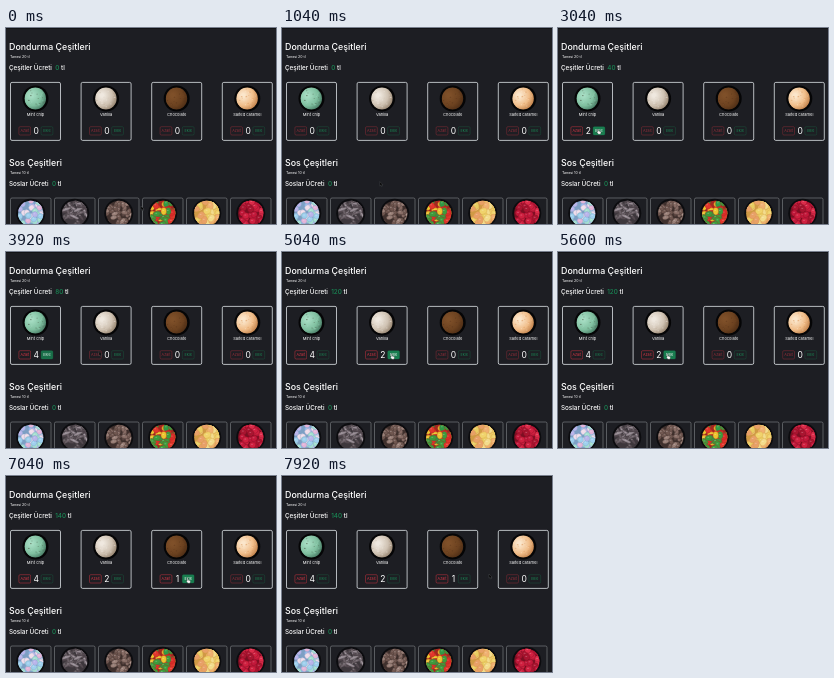
Write an HTML page that moves like this. It is 270x196 px and loops after 8 s.

```html
<!DOCTYPE html>
<html lang="tr">
<head>
<meta charset="utf-8">
<title>Dondurma Çeşitleri</title>
<style>
  html, body { margin: 0; width: 100%; height: 100%; overflow: hidden; background: #1d1e23; }
  svg { display: block; width: 270px; height: 196px; }
  text { font-family: Inter, "Liberation Sans", sans-serif; fill: #fff; white-space: pre; }
  .title { font-size: 8.85px; font-weight: 500; }
  .unit { font-size: 3.6px; }
  .total { font-size: 6.3px; font-weight: 500; }
  .sum { fill: #198754; }
  .mid { text-anchor: middle; }
  .name { font-size: 4px; }
  .count { font-size: 8.5px; }
  .label { font-size: 3.7px; }
  .card { fill: none; stroke: #dee2e6; stroke-width: .8; }
  .sauce { stroke: #85888c; stroke-width: .6; }
</style>
</head>
<body>
<svg id="stage" viewBox="0 0 270 196"></svg>
<script>
const LOOP = 8000, LEFT = 4.5, CARD_STEP = 70.6, SAUCE_STEP = 44;
const stage = document.getElementById('stage');

function add(tag, attrs = {}, parent = stage, content) {
  const el = document.createElementNS('http://www.w3.org/2000/svg', tag);
  for (const key in attrs) el.setAttribute(key, attrs[key]);
  if (content !== undefined) el.textContent = content;
  parent.append(el);
  return el;
}

function randomFrom(seed) {
  return () => (seed = (seed * 16807) % 2147483647) / 2147483647;
}

function heading(y, title, unit, total) {
  add('text', { x: 3, y, class: 'title' }, stage, title);
  add('text', { x: 4, y: y + 8, class: 'unit' }, stage, unit);
  const line = add('text', { x: 3, y: y + 20, class: 'total' });
  add('tspan', {}, line, total + '  ');
  const sum = add('tspan', { class: 'sum' }, line, '0');
  add('tspan', {}, line, ' tl');
  return sum;
}

function clipCircle(id, cx, cy, r) {
  add('circle', { cx, cy, r }, add('clipPath', { id }));
  return add('g', { 'clip-path': `url(#${id})` });
}

function scoop(cx, cy, [light, base, dark, speck], seed) {
  const rnd = randomFrom(seed);
  add('circle', { cx, cy, r: 13, fill: '#050506' });
  const shade = add('radialGradient', { id: 'shade' + seed, cx: .32, cy: .36, r: .78 });
  [light, base, dark].forEach((color, i) =>
    add('stop', { offset: [.1, .6, 1][i], 'stop-color': color }, shade));
  const g = clipCircle('scoop' + seed, cx, cy, 11.4);
  add('ellipse', { cx: cx - .2, cy, rx: 10.7, ry: 11, fill: `url(#shade${seed})` }, g);
  for (let i = 0; i < 24; i++) {
    const a = rnd() * 6.283, d = Math.sqrt(rnd()) * 9.6;
    add('ellipse', {
      cx: cx + d * Math.cos(a), cy: cy + d * Math.sin(a), rx: .4 + rnd() * .7, ry: .3 + rnd() * .4,
      fill: i % 2 ? light : speck, opacity: .5
    }, g);
  }
}

function bowl(cx, [back, ...colors], seed, long, wide) {
  const rnd = randomFrom(seed), cy = 185.3;
  add('circle', { cx, cy, r: 14.5, fill: '#0c0c0f' });
  const g = clipCircle('bowl' + seed, cx, cy, 12.6);
  add('rect', { x: cx - 14, y: cy - 14, width: 28, height: 28, fill: back }, g);
  for (let i = 0; i < 44; i++) {
    const x = cx - 13 + rnd() * 26, y = cy - 13 + rnd() * 24;
    add('ellipse', {
      cx: x, cy: y, rx: long, ry: wide, transform: `rotate(${rnd() * 180} ${x} ${y})`,
      fill: colors[Math.floor(rnd() * colors.length)], stroke: back, 'stroke-width': .3
    }, g);
    add('ellipse', { cx: x - .5, cy: y - .7, rx: 1, ry: .5, fill: '#fff', opacity: .25 }, g);
  }
}

function button(x, color, label, edge) {
  const g = add('g');
  const box = add('rect', {
    x, y: 98.7, width: 11.8, height: 8.3, rx: 1.2, fill: color, 'fill-opacity': 0,
    stroke: color, 'stroke-width': .6, 'stroke-opacity': edge
  }, g);
  const text = add('text', { x: x + 5.9, y: 104.1, class: 'mid label' }, g, label);
  text.style.fill = color;
  return { g, box, text };
}

add('rect', { width: 270, height: 196, fill: '#1d1e23' });
add('rect', { width: 270, height: 1, fill: '#121316' });

const sum = heading(22, 'Dondurma Çeşitleri', 'Tanesi 20 tl', 'Çeşitler Ücreti');
heading(138, 'Sos Çeşitleri', 'Tanesi 10 tl', 'Soslar ÜCreti');

// Each flavour: name, scoop colours, click times, and the span with a filled button
const flavours = [
  ['Mint chip', ['#a5dcc2', '#7fbf9f', '#3f705b', '#46513f'], [2160, 2680, 3300, 3640], [1680, 3900]],
  ['Vanilla', ['#efe8df', '#cfc2b2', '#8c7964', '#b39f89'], [4700, 4960], [4260, 5760]],
  ['Chocolate', ['#7f5029', '#6c4220', '#4a2b14', '#56331a'], [6840], [6520, 7440]],
  ['Salted caramel', ['#fbe6cb', '#f0bd89', '#b8763f', '#d99456'], [], [9000, 9001]]
];

const cards = flavours.map(([name, colors, clicks, hover], i) => {
  const x = LEFT + i * CARD_STEP, cx = x + 25;
  add('rect', { x, y: 54.4, width: 50, height: 58, rx: 1.5, class: 'card' });
  scoop(cx, 70.5, colors, 31 + i * 97);
  add('text', { x: cx, y: 88.2, class: 'mid name' }, stage, name);
  const less = button(cx - 16.6, '#dc3545', 'Azalt', .8);
  const count = add('text', { x: cx + .8, y: 106, class: 'mid count' }, stage, '0');
  const more = button(cx + 5.6, '#198754', 'Ekle', .4);
  return { cx, clicks, hover, less, count, more };
});

// Bowl colours with the half length and half width of one piece
const sauces = [
  [['#7d9fc4', '#9fd0ee', '#e3b4d8', '#b9b4ea', '#a5e0cf', '#8fb8ec', '#f0dcea'], 2.9, 2.7],
  [['#3d373c', '#6c6168', '#857a82', '#544a50', '#978c94'], 5, 1.3],
  [['#3f302d', '#705750', '#886d66', '#594440', '#9a8078'], 3.4, 2],
  [['#a3271f', '#d92c28', '#ecc52f', '#2f9a45', '#e2362c', '#3c9c3c'], 3.8, 2.8],
  [['#d09a45', '#f0d36c', '#efb070', '#f3dc8c', '#e8a067', '#e9cd62'], 4, 3],
  [['#7c0f22', '#c2183a', '#dc2c4a', '#a91530', '#d02040'], 3.2, 3]
];
sauces.forEach(([colors, long, wide], i) => {
  const x = LEFT + i * SAUCE_STEP;
  add('rect', { x, y: 170, width: 40.5, height: 40, rx: 1.5, class: 'card sauce' });
  bowl(x + 20.25, colors, 411 + i * 53, long, wide);
});

const cursor = add('g');
const arrow = add('path', {
  d: 'M0 0V4.3L1 3.4L1.7 5L2.5 4.6L1.8 3.1H3.1Z', fill: '#050505', stroke: '#77797d', 'stroke-width': .25
}, cursor);
const hand = add('path', {
  d: 'M.1 .3Q.6-.4 1 .3V2L3.2 2.5Q3.7 2.8 3.4 4L3 5.3H.9L-.8 3.1Q-.5 2.5 .1 3Z',
  fill: '#f5f5f5', stroke: '#111', 'stroke-width': .3
}, cursor);

// time, x, y of the pointer
const path = [
  [0, 135, 178], [700, 135, 178], [1250, 80, 142], [1680, 39.5, 101], [3720, 39.5, 101],
  [3920, 93, 99.5], [4260, 109, 102], [5760, 109, 102], [6240, 139, 106],
  [6520, 181, 102], [7440, 181, 102], [7760, 207, 98], [8000, 207, 98]
];

function pointerAt(t) {
  const i = path.findIndex(p => p[0] > t);
  const [t0, x0, y0] = path[i - 1], [t1, x1, y1] = path[i];
  const p = (t - t0) / (t1 - t0), e = p * p * (3 - 2 * p);
  return [x0 + (x1 - x0) * e, y0 + (y1 - y0) * e];
}

const clamp = v => Math.max(0, Math.min(1, v));
const mix = (a, b, p) => `rgb(${a.map((v, i) => Math.round(v + (b[i] - v) * p))})`;

function draw(t) {
  let scoops = 0;
  for (const { clicks, hover: [from, to], less, count, more } of cards) {
    const n = clicks.filter(c => c <= t).length;
    scoops += n;
    count.textContent = n;
    less.g.setAttribute('opacity', n ? .95 : .6);
    const fill = clamp((t - from) / 150) * (1 - clamp((t - to) / 150));
    more.box.setAttribute('fill-opacity', fill * .9);
    more.text.style.fill = mix([25, 135, 84], [255, 255, 255], fill);
  }
  sum.textContent = scoops * 20;

  const [x, y] = pointerAt(t);
  cursor.setAttribute('transform', `translate(${x} ${y})`);
  const overButton = y > 98 && y < 107 && cards.some(({ cx }) => Math.abs(x - cx - 11.5) < 6);
  hand.style.display = overButton ? '' : 'none';
  arrow.style.display = overButton ? 'none' : '';
}

const start = performance.now();
function frame() {
  draw((performance.now() - start) % LOOP);
  requestAnimationFrame(frame);
}
frame();
</script>
</body>
</html>
```
